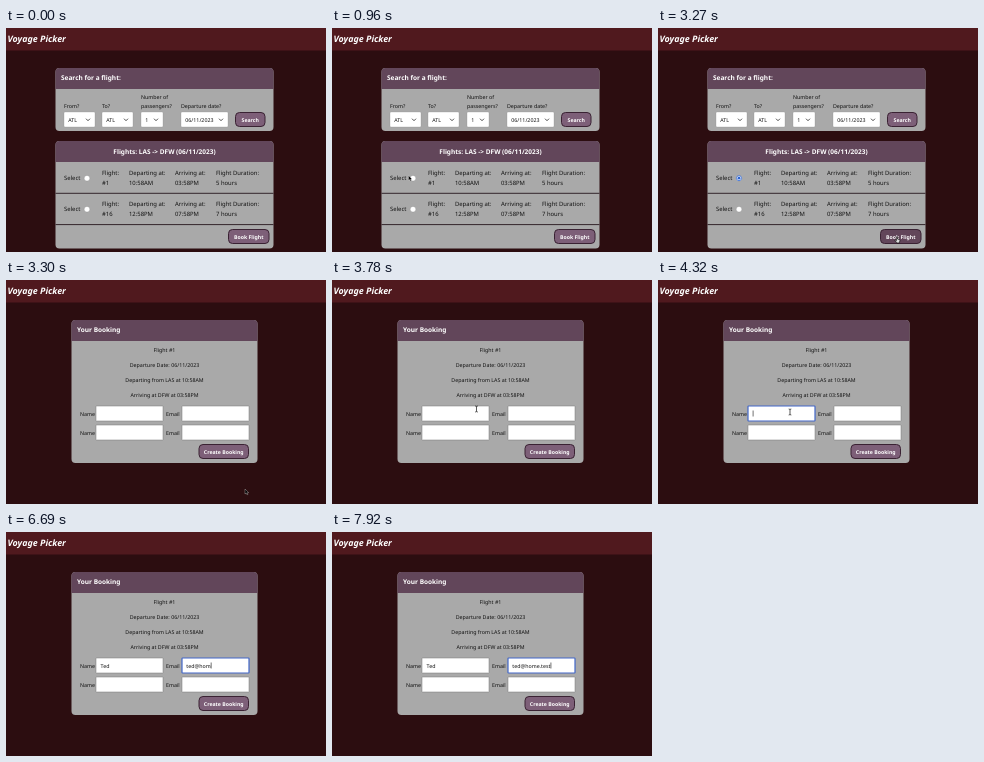
An HTML page for the animation above (8000 ms loop, 320 px wide and 224 px high).

```html
<!DOCTYPE html>
<html lang="en">
<head>
<meta charset="utf-8">
<title>Voyage Picker</title>
<style>
  html, body { margin: 0; width: 100%; height: 100%; overflow: hidden; background: #2c0d10; }
  svg { display: block; width: 320px; height: 224px; }
  text { font: 500 5.3px "Noto Sans", "Open Sans", sans-serif; fill: #111; text-rendering: geometricPrecision; }
  .brand { font-size: 8.9px; font-weight: 900; font-style: italic; fill: #fff; }
  .head { font-size: 6.5px; font-weight: 600; fill: #fff; }
  .cell { font-size: 5.9px; }
  .light { font-weight: 600; font-size: 5.2px; fill: #fff; }
  .mid { text-anchor: middle; }
</style>
</head>
<body>
<svg id="stage" viewBox="0 0 320 224"></svg>
<script>
const LOOP = 8000, SUBMIT = 3300;
const stage = document.getElementById("stage");
const $ = id => document.getElementById(id);

const text = (x, y, s, cls = "", id = "") =>
  `<text x="${x}" y="${y}" class="${cls}" id="${id}">${s.replace(">", "&gt;")}</text>`;
const box = (x, y, w, h, r, fill, extra = "") =>
  `<rect x="${x}" y="${y}" width="${w}" height="${h}" rx="${r}" fill="${fill}" ${extra}/>`;
const line = y => `<path d="M49.5 ${y}h218" stroke="#33252b"/>`;

const panel = (x, y, w, h) =>
  box(x, y, w, h, 4, "#a9a9a9") +
  `<path d="M${x} ${y + 21}v-17q0 -4 4 -4h${w - 8}q4 0 4 4v17z" fill="#62465a"/>`;

const button = (x, y, w, label, id = "") =>
  box(x + .5, y + .5, w - 1, 14, 4, "#7d5f78", `stroke="#3a2233" id="${id}"`) +
  text(x + w / 2, y + 9.5, label, "light mid");

const select = (x, w, value) =>
  box(x, 84, w, 15, 1, "#fff", 'stroke="#888" stroke-width=".3"') +
  text(x + 4.3, 93.5, value) +
  `<path d="M${x + w - 9} 90.7l2 2 2 -2" fill="none" stroke="#222" stroke-width=".8"/>`;

const field = (x, y, id = "") =>
  box(x, y, 67, 15, .5, "#fff", `stroke="#777" stroke-width=".5" id="${id}"`);

const flight = (y, number, leaves, lands, hours) =>
  text(58, y + 4.9, "Select", "cell") +
  `<circle cx="81" cy="${y + 3.2}" r="2.8" fill="#fff" stroke="#777" stroke-width=".3"/>` +
  [[96, "Flight:", number], [123, "Departing at:", leaves],
   [169, "Arriving at:", lands], [210, "Flight Duration:", hours]]
    .map(([x, a, b]) => text(x, y, a, "cell") + text(x, y + 10, b, "cell")).join("");

const searchPage =
  panel(49.5, 40, 218, 63) + text(55, 52.2, "Search for a flight:", "head") +
  text(58, 79.5, "From?") + text(96, 79.5, "To?") +
  text(135, 71.2, "Number of") + text(135, 79.5, "passengers?") +
  text(175, 79.5, "Departure date?") +
  select(58, 31, "ATL") + select(96, 31, "ATL") + select(135, 22, "1") +
  select(175, 47, "06/11/2023") + button(229, 84, 30.5, "Search") +
  panel(49.5, 113, 218, 107.5) + text(158.5, 125.6, "Flights: LAS -> DFW (06/11/2023)", "head mid") +
  flight(147, "#1", "10:58AM", "03:58PM", "5 hours") + line(165.3) +
  flight(178, "#16", "12:58PM", "07:58PM", "7 hours") + line(196.6) +
  `<g id="picked" fill="#2b63d0"><circle cx="81" cy="150.2" r="2.5" fill="#fff" stroke="#2b63d0" stroke-width=".8"/>
   <circle cx="81" cy="150.2" r="1.4"/></g>` +
  button(222, 201, 41.5, "Book Flight", "book");

const bookingPage =
  panel(65.5, 40, 186, 143) + text(71, 52.2, "Your Booking", "head") +
  ["Flight #1", "Departure Date: 06/11/2023", "Departing from LAS at 10:58AM",
   "Arriving at DFW at 03:58PM"]
    .map((s, i) => text(158.5, 71.5 + 15.2 * i, s, "mid")).join("") +
  [126, 145].map((y, i) =>
    text(74, y + 9.6, "Name") + text(160, y + 9.6, "Email") +
    field(90, y, "name" + i) + field(176, y, "mail" + i)).join("") +
  text(94.6, 135.6, "", "", "nameText") + text(180.3, 135.6, "", "", "mailText") +
  button(192.5, 164, 50.5, "Create Booking") +
  `<path id="caret" d="M0 130.5v6" stroke="#111" stroke-width=".6"/>`;

const cursors = {
  arrow: '<path d="M0 0v5l1.2 -1 .9 1.8 .8 -.4 -.8 -1.7h1.6z" fill="#000" stroke="#fff" stroke-width=".3"/>',
  hand: '<path d="M-.6 0q.6 -.7 1.1 0v2l2 .5q.6 .3 .4 1.1l-.5 2.3h-2.6l-1.8 -2.3q0 -.8 .8 -.4l.6 .5z" fill="#ddd" stroke="#000" stroke-width=".6"/>',
  beam: '<path d="M-1.3 -3q1.3 0 1.3 .7 0 -.7 1.3 -.7M0 -2.3v4.6M-1.3 3q1.3 0 1.3 -.7 0 .7 1.3 .7" fill="none" stroke="#111" stroke-width=".7"/>'
};

stage.innerHTML =
  box(0, 0, 320, 224, 0, "#2c0d10") + box(0, 0, 320, 22.5, 0, "#50191e") +
  text(1.5, 14.3, "Voyage Picker", "brand") +
  `<g id="search">${searchPage}</g><g id="booking">${bookingPage}</g><g id="cursor">` +
  Object.entries(cursors).map(([k, d]) => `<g id="${k}">${d}</g>`).join("") + "</g>";

// time, x, y
const path = [
  [0, 152, 228], [630, 152, 226], [960, 76.5, 147.5], [1170, 80, 148.5],
  [2340, 80, 148.5], [2820, 239, 209], [3600, 239, 209],
  [3780, 144.5, 129], [4320, 132, 132]
];
const nameKeys = [4710, 4830, 4950];
const mailKeys = [5490, 5580, 5670, 6060, 6390, 6540, 6690, 6870, 6960, 7110, 7470, 7680, 7920];

const show = (id, on) => $(id).setAttribute("display", on ? "inline" : "none");
const typed = (s, keys, t) => s.slice(0, keys.filter(k => t >= k).length);

function cursorAt(t) {
  const i = path.findIndex(p => t < p[0]);
  if (i < 0) return path[path.length - 1].slice(1);
  const [t0, x0, y0] = path[i - 1], [t1, x1, y1] = path[i];
  const u = (t - t0) / (t1 - t0), e = u * u * (3 - 2 * u);
  return [x0 + (x1 - x0) * e, y0 + (y1 - y0) * e];
}

function focus(id, on) {
  $(id).setAttribute("stroke", on ? "#4267c8" : "#777");
  $(id).setAttribute("stroke-width", on ? 1.2 : .5);
}

function draw(t) {
  const booking = t >= SUBMIT, inMail = t >= 5190;
  show("search", !booking);
  show("booking", booking);
  show("picked", t >= 1500);

  const [x, y] = cursorAt(t);
  const overBook = !booking && x > 222 && y > 201;
  const shape = overBook ? "hand" : booking && y < 141 ? "beam" : "arrow";
  $("cursor").setAttribute("transform", `translate(${x} ${y})`);
  show("cursor", t < nameKeys[0]);
  for (const k in cursors) show(k, k === shape);
  $("book").setAttribute("fill", overBook ? "#62465a" : "#7d5f78");

  $("nameText").textContent = typed("Ted", nameKeys, t);
  $("mailText").textContent = typed("ted@home.test", mailKeys, t);
  focus("name0", t >= 4320 && !inMail);
  focus("mail0", inMail);
  show("caret", t >= 4320);
  if (booking) {
    const input = $(inMail ? "mailText" : "nameText");
    const end = +input.getAttribute("x") + input.getComputedTextLength() + .5;
    $("caret").setAttribute("transform", `translate(${end} 0)`);
  }
}

const start = performance.now();
function tick() {
  draw((performance.now() - start) % LOOP);
  requestAnimationFrame(tick);
}
tick();
</script>
</body>
</html>
```
